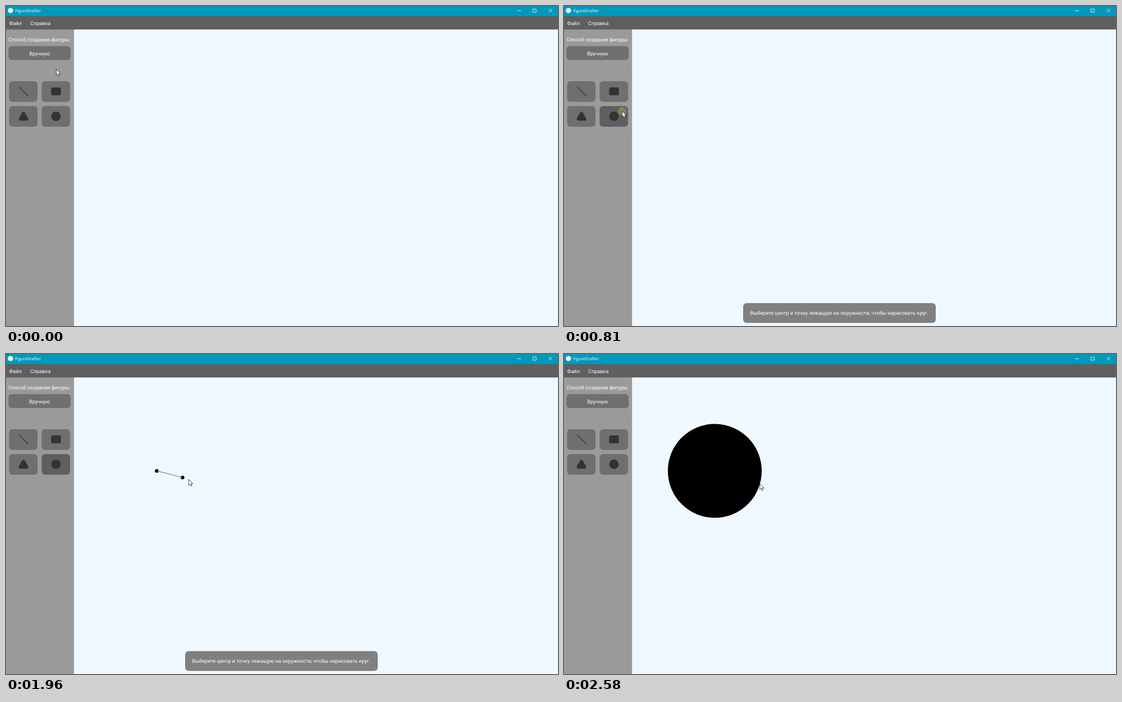
An HTML page for the animation above (3110 ms loop, 983 by 570 pixels).

```html
<!DOCTYPE html>
<html lang="ru">
<head>
<meta charset="utf-8">
<title>FigureDrafter</title>
<style>
  html, body { margin: 0; width: 100%; height: 100%; overflow: hidden; background: #f0f8ff; }
  svg { display: block; width: 983px; height: 570px; }
  text { font: 9.12px Roboto, "Noto Sans", sans-serif; fill: #fff; text-rendering: geometricPrecision; }
  .title { font: 7.4px "Open Sans", "Noto Sans", sans-serif; }
  .mid { text-anchor: middle; }
  .btn { fill: #6f6f6f; }
  .btn.hover { fill: #808080; }
  .btn.active { fill: #5f5f5f; }
  .icon { fill: #333; stroke: #333; stroke-width: 0; }
  .controls { fill: none; stroke: #fff; stroke-width: .8; }
</style>
</head>
<body>
<svg viewBox="0 0 983 570">
  <rect width="983" height="570" fill="#f0f8ff"/>

  <rect y="41" width="121.2" height="529" fill="#9a9a9a"/>
  <rect y="17" width="983" height="24.8" fill="#5f5f5f"/>
  <rect width="983" height="18" fill="#0099bc"/>
  <circle cx="8" cy="8" r="4.6" fill="#fff"/>
  <text class="title" x="16.3" y="11.3">FigureDrafter</text>
  <path class="controls" d="M910 8.5h7M938.3 5.3h5.8v5.8h-5.8zM966.4 5l6.2 6.2M972.6 5l-6.2 6.2"/>
  <text x="5.5" y="34">Файл</text>
  <text x="43" y="34">Справка</text>

  <text x="4.2" y="63">Способ создания фигуры:</text>
  <rect class="btn" x="4.4" y="71.5" width="110.8" height="24.8" rx="6"/>
  <text class="mid" x="59.8" y="87.5">Вручную</text>

  <rect class="btn" x="5.5" y="134" width="50.6" height="36.8" rx="6"/>
  <rect class="btn" id="rectBtn" x="63.5" y="134" width="50.6" height="36.8" rx="6"/>
  <rect class="btn" x="5.5" y="178.2" width="50.6" height="36.8" rx="6"/>
  <rect class="btn" id="circleBtn" x="63.5" y="178.2" width="50.6" height="36.8" rx="6"/>
  <path class="icon" d="M22.8 143.6L39.6 160.3" style="stroke-width:1.3"/>
  <rect class="icon" x="80.5" y="145" width="17.2" height="14" rx="2.6"/>
  <path class="icon" d="M31 191.5L25.6 201.2H36.6Z" style="stroke-width:6;stroke-linejoin:round"/>
  <circle class="icon" cx="89" cy="196.4" r="8.5"/>

  <g id="toast">
    <rect x="319" y="529.2" width="343" height="35.2" rx="6" fill="#808080"/>
    <text class="mid" x="490.3" y="550.3">Выберите центр и точку лежащую на окружности, чтобы нарисовать круг.</text>
  </g>

  <circle id="center" cx="268.5" cy="208.2" r="3.3"/>
  <g id="radius">
    <circle id="end" r="3.3"/>
    <line id="line" x1="268.5" y1="208.2" stroke="#808080" stroke-width="1.2"/>
  </g>
  <circle id="disc" cx="268.5" cy="208.2" r="83.6"/>

  <circle id="click" r="7.6" fill="#fff81e"/>
  <path id="cursor" d="M0 0V10.6L2.4 8.4L4.1 12.1L5.8 11.4L4.2 7.7H7.5Z" fill="#fff" stroke="#111" stroke-width=".75"/>
</svg>

<script>
  const LOOP = 3110, FRAME = 68, PHASE = 190;
  const LAG = 50; // the free end trails the pointer
  const el = id => document.getElementById(id);

  const linear = p => p;
  const easeIn = p => p * p;
  const easeOut = p => p * (2 - p);
  const easeInOut = p => p * p * (3 - 2 * p);

  const path = [
    { t: 130, x: 89.5, y: 112.7 },
    { t: 530, x: 99, y: 187, ease: easeInOut },
    { t: 740, x: 99, y: 187, ease: linear },
    { t: 938, x: 147.5, y: 191, ease: easeIn },
    { t: 1414, x: 268.8, y: 208.5, ease: easeOut },
    { t: 1700, x: 268.8, y: 208.5, ease: linear },
    { t: 1958, x: 325.3, y: 223.3, ease: linear },
    { t: 2230, x: 348.8, y: 231, ease: easeOut }
  ];
  const [pick, place, finish] = [740, 1630, 2440]; // clicks

  function pointerAt(t) {
    const i = path.findIndex(k => k.t > t);
    if (i === 0) return path[0];
    if (i < 0) return path[path.length - 1];
    const a = path[i - 1], b = path[i];
    const p = b.ease((t - a.t) / (b.t - a.t));
    return { x: a.x + (b.x - a.x) * p, y: a.y + (b.y - a.y) * p };
  }

  function glowAt(t) {
    const age = t - [pick, place, finish].filter(c => c <= t).pop();
    return age >= 0 ? .58 * Math.max(0, 1 - .6 * Math.floor(age / 70)) : 0;
  }

  const show = (id, on) => { el(id).style.display = on ? "" : "none"; };
  const set = (id, attrs) => {
    for (const name in attrs) el(id).setAttribute(name, attrs[name]);
  };
  const hover = (id, { x, y }) => {
    const b = el(id).getBBox();
    const on = x >= b.x && x <= b.x + b.width && y >= b.y && y <= b.y + b.height;
    el(id).classList.toggle("hover", on);
  };

  function draw(t) {
    const shot = PHASE + Math.floor((t - PHASE) / FRAME) * FRAME;
    const tip = pointerAt(shot), end = pointerAt(shot - LAG);
    const drawing = t >= pick + 70 && t < finish;
    const done = t >= finish + 80;

    set("cursor", { transform: `translate(${tip.x} ${tip.y})` });
    set("click", { cx: tip.x, cy: tip.y, opacity: glowAt(t) });
    hover("rectBtn", tip);
    hover("circleBtn", tip);
    el("circleBtn").classList.toggle("active", drawing);

    show("toast", drawing);
    show("center", t >= place + 70 && !done);
    show("radius", t >= place + 140 && !done);
    show("disc", done);
    set("end", { cx: end.x, cy: end.y - .4 });
    set("line", { x2: end.x, y2: end.y - .4 });
  }

  const start = performance.now();
  function tick() {
    draw((performance.now() - start) % LOOP);
    requestAnimationFrame(tick);
  }
  tick();
</script>
</body>
</html>
```
